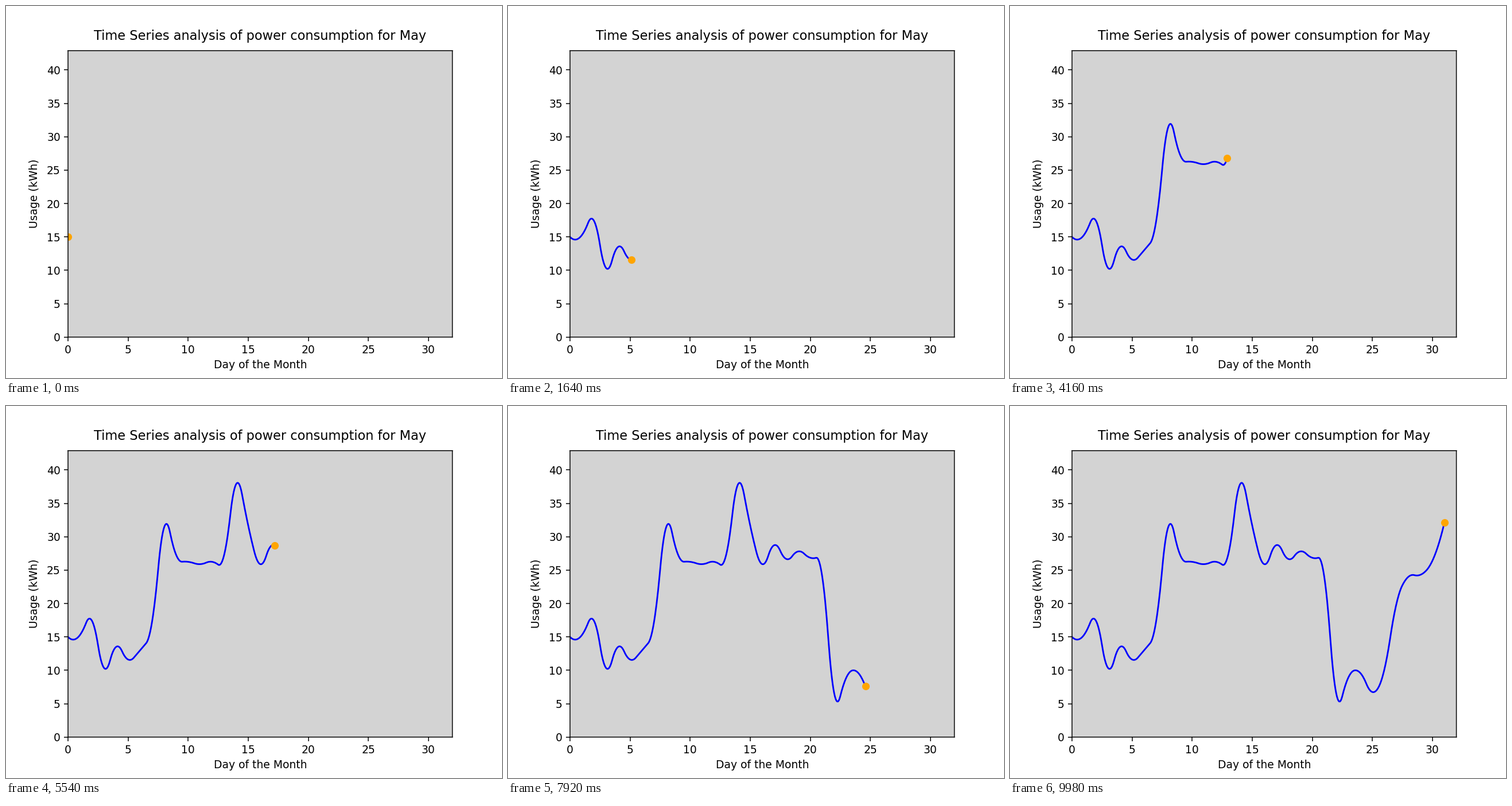
A matplotlib script for the animation above (10000 ms loop, 864 by 648 pixels).

```python
import matplotlib.pyplot as plt
import numpy as np
from matplotlib.animation import FuncAnimation

FRAMES = 500
INTERVAL = 20

plt.rcParams["path.snap"] = False


def surge(level, count):
    """Cubic growth from a level."""
    return level + 0.3 * np.arange(count) ** 3


def ringing(level, drift, swing, count):
    """Day-to-day swings that die down around a drifting level."""
    n = np.arange(count)
    return level + drift * n + swing * (-0.65) ** n


def dip(level, count):
    """Shallow parabola with its lowest point in the middle."""
    return level + 0.35 * (np.arange(count) - count // 2) ** 2


def quadratic_basis(x, knots):
    """Parabola terms plus one truncated square per knot."""
    steps = np.clip(x[:, None] - knots, 0, None) ** 2
    return np.column_stack([np.ones_like(x), x, x ** 2, steps])


def smooth(x, y, x_fine):
    """Quadratic spline through the points, with knots halfway between them."""
    knots = ((x[1:] + x[:-1]) / 2)[1:-1]
    coefs = np.linalg.solve(quadratic_basis(x, knots), y)
    return quadratic_basis(x_fine, knots) @ coefs


# Daily usage in kWh: calm stretches joined by a few sharp turns
usage = np.concatenate([
    surge(15, 3),
    ringing(12.2, 0.1, -1.85, 4),
    [17.3, 31.4],
    dip(25.9, 5),
    [37.9, 31.7],
    ringing(27.7, -0.13, -1.8, 5),
    [24, 6.5, 8.9, 9.6, 6.75, 10.1, 19.9],
    surge(24, 4),
])
days = np.arange(len(usage), dtype=float)
xs = np.linspace(0, days[-1], FRAMES)
ys = smooth(days, usage, xs)

fig, ax = plt.subplots(figsize=(6.4, 4.8), dpi=135)
ax.set_facecolor("lightgrey")
ax.set_xlim(0, 32)
ax.set_ylim(0, usage.max() + 5)
ax.set_xticks(range(0, 31, 5))
ax.set_yticks(range(0, 41, 5))
ax.set_title("Time Series analysis of power consumption for May", pad=10)
ax.set_xlabel("Day of the Month")
ax.set_ylabel("Usage (kWh)", labelpad=6.4)

line, = ax.plot([], [], color="blue")
dot, = ax.plot([], [], "o", color="orange")


def update(i):
    # The line trails one sample behind the dot
    line.set_data(xs[:i], ys[:i])
    dot.set_data([xs[i]], [ys[i]])
    return line, dot


anim = FuncAnimation(fig, update, frames=FRAMES, interval=INTERVAL,
                     repeat=True, repeat_delay=0)
plt.show()
```
